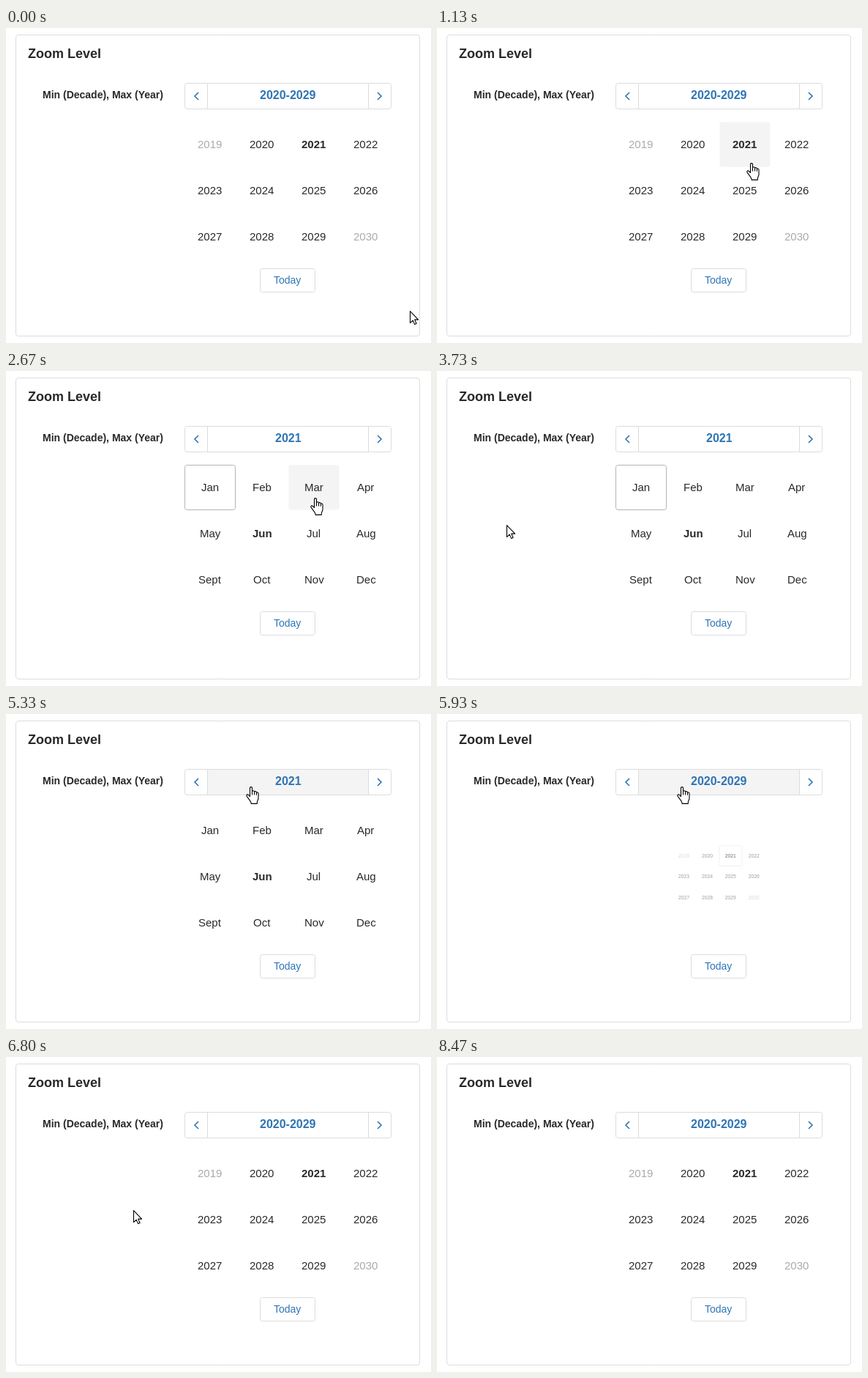
Animation, 581 px wide and 430 px high, one loop 8.99 s. Source, as an HTML page with a canvas:

```html
<!DOCTYPE html>
<html lang="en">
<head>
<meta charset="utf-8">
<title>Zoom Level</title>
<style>
  html, body { margin: 0; width: 100%; height: 100%; overflow: hidden; background: #fff; }
  canvas { display: block; }
</style>
</head>
<body>
<canvas id="stage" width="581" height="430"></canvas>
<script>
const ctx = document.getElementById('stage').getContext('2d');
const LOOP = 8990, TICK = 200 / 3;
const INK = '#292929', BLUE = '#2f75b5', LINE = '#dcdcdc', HOVER = '#f4f4f4', MUTED = '#aaa';
const YEARS = Array.from({ length: 12 }, (_, i) => String(2019 + i));
const MONTHS = 'Jan Feb Mar Apr May Jun Jul Aug Sept Oct Nov Dec'.split(' ');
const CENTER = { x: 385.5, y: 222 };

// Pointer moves: start, end, from, control point, to
const MOVES = [
  [333, 1267, [552, 386], [490, 270], [422, 173]],
  [1267, 1333, [422, 173], [422, 171], [422, 170]],
  [1600, 1733, [422, 170], [422, 172], [422, 173]],
  [3267, 3733, [422, 173], [300, 126], [95, 210]],
  [4600, 5333, [95, 210], [205, 180], [334, 99]],
  [6133, 6667, [334, 99], [270, 170], [174, 209]],
  [7467, 7600, [174, 209], [190, 207], [205, 205]],
  [7933, 8467, [205, 205], [120, 290], [57, 432]]
];

const clamp = v => Math.max(0, Math.min(1, v));
const smooth = u => u * u * (3 - 2 * u);

// cubic-bezier(0, 0, .58, 1)
function easeOut(x) {
  let lo = 0, hi = 1;
  for (let i = 0; i < 24; i++) {
    const s = (lo + hi) / 2;
    if (1.74 * s * s * (1 - s) + s * s * s < x) lo = s; else hi = s;
  }
  return smooth(lo);
}

function pointerAt(t) {
  let move = MOVES[0];
  for (const m of MOVES) if (t >= m[0]) move = m;
  const [start, end, a, c, b] = move;
  const u = smooth(clamp((t - start) / (end - start))), v = 1 - u;
  const at = i => Math.round(v * v * a[i] + 2 * u * v * c[i] + u * u * b[i]);
  return { x: at(0), y: at(1) };
}

function box(x, y, w, h, r, stroke, fill) {
  ctx.beginPath();
  ctx.roundRect(x + 0.5, y + 0.5, w - 1, h - 1, r);
  if (fill) { ctx.fillStyle = fill; ctx.fill(); }
  if (stroke) { ctx.strokeStyle = stroke; ctx.lineWidth = 1; ctx.stroke(); }
}

function text(str, x, y, size, color, bold, centered) {
  ctx.font = `${bold ? 'bold ' : ''}${size}px "Liberation Sans", Arial, sans-serif`;
  ctx.fillStyle = color;
  if (centered) x = Math.round(x - ctx.measureText(str).width / 2);
  ctx.fillText(str, x, y);
}

function chevron(x, dir) {
  ctx.beginPath();
  ctx.moveTo(x - 2.5 * dir, 88);
  ctx.lineTo(x + 2.5 * dir, 93);
  ctx.lineTo(x - 2.5 * dir, 98);
  ctx.strokeStyle = BLUE;
  ctx.lineWidth = 1.6;
  ctx.stroke();
}

const inside = (p, x, y, w, h) => p.x >= x && p.x < x + w && p.y >= y && p.y < y + h;

function header(title, p) {
  box(244, 75, 283, 36, 3, LINE, '#fff');
  ctx.fillStyle = HOVER;
  if (inside(p, 276, 76, 219, 34)) ctx.fillRect(276, 76, 219, 34);
  ctx.fillStyle = LINE;
  ctx.fillRect(275, 76, 1, 34);
  ctx.fillRect(495, 76, 1, 34);
  chevron(260.5, -1);
  chevron(510.5, 1);
  text(title, 385.3, 97, 16, BLUE, true, true);
}

function grid(labels, bold, focus, hover, muted) {
  labels.forEach((label, i) => {
    const x = 244 + 71 * (i % 4), y = 128 + 63 * Math.floor(i / 4);
    if (i === hover) box(x, y, 70, 62, 3, null, HOVER);
    if (i === focus) box(x, y, 70, 62, 3, '#b4b4b4');
    text(label, x + 34.9, y + 36, 15, muted.includes(i) ? MUTED : INK, i === bold, true);
  });
}

function hoverCell(p) {
  const col = Math.floor((p.x - 244) / 71), row = Math.floor((p.y - 128) / 63);
  return col >= 0 && col < 4 && row >= 0 && row < 3 ? row * 4 + col : -1;
}

function outline(path) {
  ctx.fillStyle = '#fff';
  ctx.fill(path);
  ctx.strokeStyle = '#000';
  ctx.lineWidth = 1.1;
  ctx.lineJoin = 'round';
  ctx.stroke(path);
}

const ARROW = new Path2D('M.5 .7V16.6L4.2 13.1L6.6 18.6L9.1 17.5L6.7 12.1H11.6Z');
const HAND = new Path2D('M5.5 13.5V2.2Q5.5 .6 7 .6Q8.5 .6 8.5 2.2V7Q8.7 5.7 10 5.8Q11.4 5.9 11.5 7.3' +
  'Q11.8 6.4 13 6.6Q14.3 6.8 14.4 8.2Q14.9 7.6 15.8 7.9Q17 8.3 17 9.6V15.5Q17 17.5 15.9 19.3Q15.3 20.4 15.2 23.4' +
  'H7.2Q7 21.2 5.6 19.3L1.2 13.4Q.2 11.9 1.3 11.1Q2.4 10.5 3.6 11.6Z');
const KNUCKLES = new Path2D('M8.5 7V11.5M11.5 7.3V11.5M14.4 8.2V11.8');

function pointer(p, link) {
  ctx.save();
  ctx.translate(link ? p.x - 6 : p.x, p.y);
  outline(link ? HAND : ARROW);
  if (link) ctx.stroke(KNUCKLES);
  ctx.restore();
}

function draw(ms) {
  const t = Math.floor((ms + 5) / TICK) * TICK + 1;
  const p = pointerAt(t), cell = hoverCell(p);
  const year = t >= 2330 && t < 5930;

  ctx.clearRect(0, 0, 581, 430);
  box(13, 9, 553, 412, 3.5, LINE, '#fff');
  text('Zoom Level', 30, 41, 18, INK, true);
  text('Min (Decade), Max (Year)', 50, 96, 14, INK, true);
  header(year ? '2021' : '2020-2029', p);
  box(347, 328, 76, 33, 3, LINE);
  text('Today', 385, 349, 14, BLUE, false, true);

  // Each new view grows and fades in about the grid centre
  const began = t < 2330 ? -400 : year ? 2231 : 5813;
  const k = easeOut(clamp((t - began) / 400));
  ctx.save();
  ctx.globalAlpha = k;
  ctx.translate(CENTER.x, CENTER.y);
  ctx.scale(k, k);
  ctx.translate(-CENTER.x, -CENTER.y);
  if (year) grid(MONTHS, 5, t < 4000 ? 0 : -1, cell, []);
  else grid(YEARS, 2, t >= 5930 && t < 6800 ? 2 : -1, cell, [0, 11]);
  ctx.restore();

  pointer(p, cell >= 0 || inside(p, 244, 75, 283, 36));
}

function frame() {
  draw(performance.now() % LOOP);
  requestAnimationFrame(frame);
}
frame();
</script>
</body>
</html>
```
